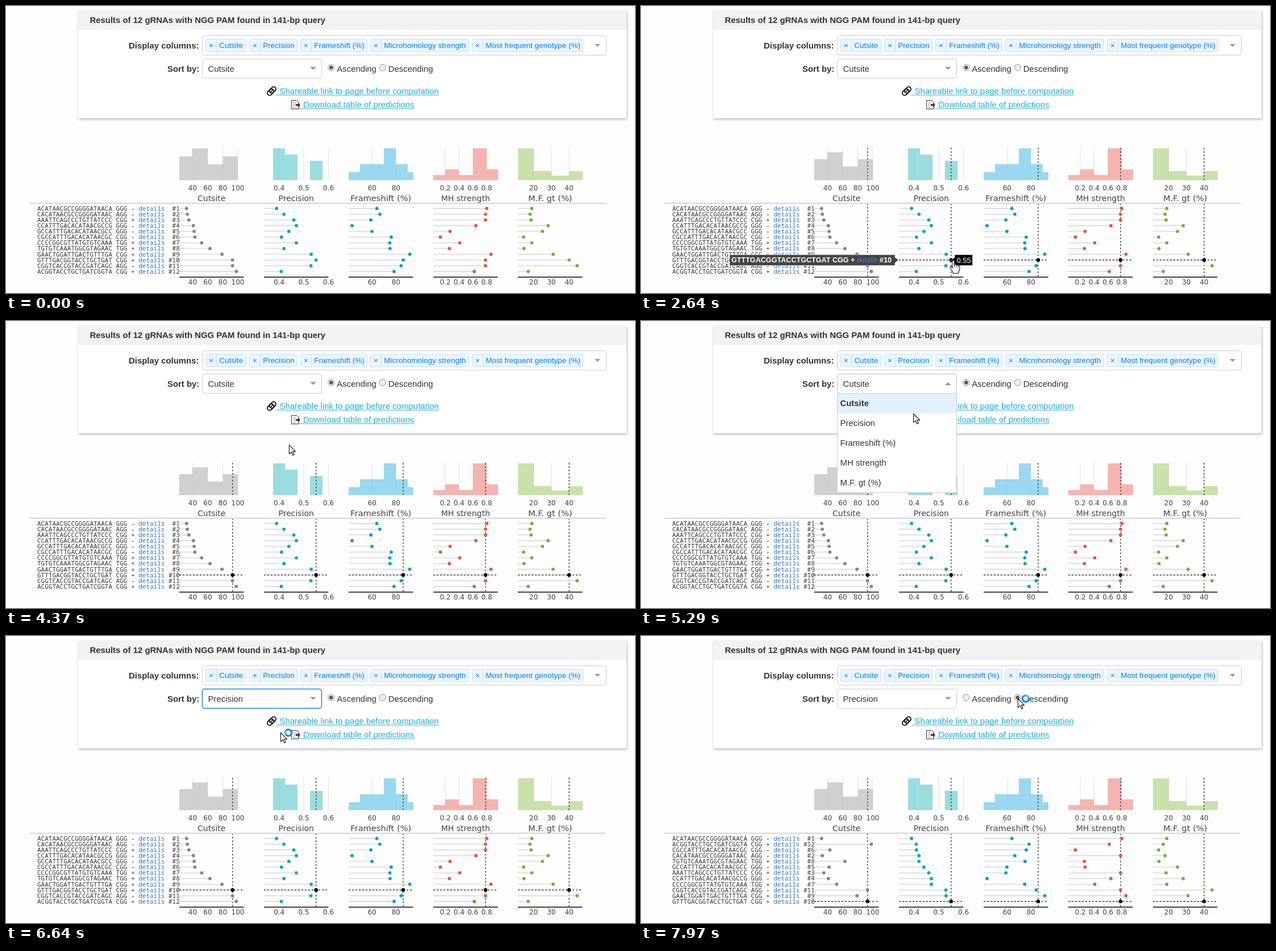
An HTML page for the animation above (8000 ms loop, 1107 by 506 pixels).

```html
<!DOCTYPE html>
<html lang="en">
<head>
<meta charset="utf-8">
<title>gRNA results</title>
<style>
html, body { margin: 0; width: 100%; height: 100%; overflow: hidden; background: #fdfdfd; }
svg { display: block; width: 1107px; height: 506px; }
text { white-space: pre; font-family: "Liberation Sans", Arial, sans-serif; font-size: 14.92px; fill: #333; }
.bold { font-weight: bold; }
.axis { font-family: "DejaVu Sans", Verdana, sans-serif; font-size: 12px; fill: #444; text-anchor: middle; }
.seq { font-family: "Noto Sans Mono", "DejaVu Sans Mono", monospace; font-size: 11px; fill: #333; }
.chip { font-size: 13.5px; fill: #007eff; }
.panel { filter: drop-shadow(1px 2px 2px rgba(0, 0, 0, .27)); }
.dash { stroke: #444; stroke-width: 1.4; stroke-dasharray: 3 3; }
.bars { shape-rendering: crispEdges; }
</style>
</head>
<body>
<svg id="stage" viewBox="0 0 1107 506"></svg>
<script>
const LOOP = 8000;
const stage = document.getElementById('stage');

function el(tag, attrs = {}, parent = stage) {
  const node = document.createElementNS('http://www.w3.org/2000/svg', tag);
  for (const key in attrs) node.setAttribute(key, attrs[key]);
  parent.appendChild(node);
  return node;
}
const group = (parent, attrs) => el('g', attrs, parent);
const rect = (x, y, width, height, fill, parent, more) =>
  el('rect', { x, y, width, height, fill, ...more }, parent);
const path = (d, attrs, parent) => el('path', { d, fill: 'none', ...attrs }, parent);
const dot = (cx, cy, r, fill, parent, more) => el('circle', { cx, cy, r, fill, ...more }, parent);
function text(x, y, str, parent, more) {
  const node = el('text', { x, y, ...more }, parent);
  node.textContent = str;
  return node;
}
function span(str, parent, attrs) {
  el('tspan', attrs, parent).textContent = str;
}
const show = (node, on) => { node.style.display = on ? '' : 'none'; };

// Settings panel
rect(127, 8, 965, 190, '#fff', stage, { class: 'panel' });
rect(127, 8, 965, 34, '#f2f2f2');
text(147.5, 30, 'Results of 12 gRNAs with NGG PAM found in 141-bp query', stage, { class: 'bold' });
text(216, 74.5, 'Display columns:', stage, { class: 'bold' });
text(284, 115.5, 'Sort by:', stage, { class: 'bold' });
rect(345.5, 52.5, 711, 34, '#fff', stage, { rx: 4, stroke: '#ccc' });
path('M1036 67h10l-5 5z', { fill: '#999' });

let chipX = 351;
for (const name of ['Cutsite', 'Precision', 'Frameshift (%)',
  'Microhomology strength', 'Most frequent genotype (%)']) {
  const box = rect(chipX + .5, 58.5, 0, 22, '#ebf5ff', stage, { rx: 2, stroke: '#c2e0ff' });
  path(`M${chipX + 19.5} 58.5v22`, { stroke: '#c2e0ff' });
  text(chipX + 6, 73.5, '×', stage, { class: 'chip' });
  const label = text(chipX + 24.3, 74, name, stage, { class: 'chip' });
  const width = Math.round(label.getComputedTextLength() + 29.7);
  box.setAttribute('width', width - 1);
  chipX += width + 5;
}

const sortBox = rect(345.5, 93.5, 210, 34, '#fff', stage, { rx: 4, stroke: '#ccc' });
const sortText = text(355.5, 115.5, 'Cutsite');
const sortArrow = path('', { fill: '#999' });

function radio(x, label) {
  dot(x, 108.5, 5.6, '#eee', stage, { stroke: '#8d8d8d' });
  text(x + 10, 115.5, label);
  return dot(x, 108.5, 3.2, '#555');
}
const ascDot = radio(572.3, 'Ascending');
const descDot = radio(662.8, 'Descending');

function link(x, y, label, to) {
  const g = group(stage);
  text(x, y, label, g, { style: 'fill: inherit' });
  path(`M${x - 5.5} ${y + 1.5}H${to}v1H${x - 5.5}z`, { fill: 'inherit' }, g);
  return { g, x0: x - 23, x1: to, y0: y - 14, y1: y + 4 };
}
const links = [
  link(481.5, 155, 'Shareable link to page before computation', 762),
  link(523, 179, 'Download table of predictions', 719)
];
const chain = group(stage, { transform: 'translate(467.5 150) rotate(-45)' });
for (const x of [-9, -3.5]) {
  rect(x, -4, 12.5, 8, 'none', chain, { rx: 4, stroke: '#1a1a1a', 'stroke-width': 2 });
}
path('M-4 0h8', { stroke: '#1a1a1a', 'stroke-width': 1.8 }, chain);
path('M502.5 166.5h9l4 4v11h-13z', { fill: '#fff', stroke: '#333' });
path('M505 170h5M505 173h5M505 176h4M505 179h6', { stroke: '#999' });
path('M510 173h4v-2.5l4 4-4 4v-2.5h-4z', { fill: '#5c2430' });

// One entry per gRNA, in order of cut site
const SEQS = `ACATAACGCCGGGGATAACA GGG -
CACATAACGCCGGGGATAAC AGG -
AAATTCAGCCCTGTTATCCC CGG +
CCATTTGACACATAACGCCG GGG -
GCCATTTGACACATAACGCC GGG -
CGCCATTTGACACATAACGC CGG -
CCCCGGCGTTATGTGTCAAA TGG +
TGTGTCAAATGGCGTAGAAC TGG +
GAACTGGATTGACTGTTTGA CGG +
GTTTGACGGTACCTGCTGAT CGG +
CGGTCACCGTACCGATCAGC AGG -
ACGGTACCTGCTGATCGGTA CGG +`.split('\n');
const CHARTS = [
  { name: 'Cutsite', lo: 22.3, hi: 107.9, step: 20, bin: 20, from: 20, tint: '#cfd0d1', ink: '#858585',
    data: [32, 33, 35, 41, 42, 43, 52, 63, 79, 93, 93, 98] },
  { name: 'Precision', lo: .339, hi: .6, step: .1, bin: .05, from: .375, tint: '#99dddf', ink: '#00a8b5',
    data: [.39, .42, .46, .47, .44, .41, .47, .42, .53, .55, .529, .409] },
  { name: 'Frameshift (%)', lo: 40.4, hi: 94.3, step: 20, bin: 10, from: 40, tint: '#99d8f0', ink: '#0a9ad7',
    data: [64, 66.5, 59, 43.3, 59.9, 76, 74.8, 75, 91.5, 86, 84.3, 78.4] },
  { name: 'MH strength', lo: .027, hi: .96, step: .2, bin: .2, from: 0, tint: '#f6b4b0', ink: '#e6553f',
    data: [.801, .783, .783, .644, .27, .13, .41, .26, .861, .783, .783, .62] },
  { name: 'M.F. gt (%)', lo: 11.2, hi: 47.5, step: 10, bin: 10, from: 10, tint: '#cbe1ac', ink: '#7aac3e',
    data: [19, 18, 18.6, 28.2, 25, 14.4, 19, 14.6, 31, 40, 44.5, 17] }
];
const WIDTH = 113.5;
const PICK = 9;

CHARTS.forEach((c, i) => {
  c.left = 305 + 149 * i;
  c.x = v => c.left + (Math.min(Math.max(v, c.lo), c.hi) - c.lo) / (c.hi - c.lo) * WIDTH;
  const ticks = [];
  for (let n = Math.ceil(c.lo / c.step); n * c.step < c.hi + 1e-6; n++) ticks.push(n * c.step);
  for (const v of ticks) {
    path(`M${c.x(v)} 248V307`, { stroke: '#ebebeb' });
    for (const y of [325, 491]) text(c.x(v), y, +v.toFixed(1), stage, { class: 'axis' });
  }

  c.bars = group(stage, { class: 'bars' });
  const counts = [];
  for (const v of c.data) {
    const n = Math.floor((v - c.from) / c.bin);
    counts[n] = (counts[n] || 0) + 1;
  }
  const unit = 56 / Math.max(...counts.filter(Boolean));
  counts.forEach((count, n) => {
    const a = c.x(c.from + n * c.bin), b = c.x(c.from + (n + 1) * c.bin);
    rect(a, 307 - count * unit, b - a, count * unit, c.tint, c.bars);
  });
  for (const v of ticks) path(`M${c.x(v)} 251V307`, { stroke: '#000', opacity: .04 });

  const size = c.name.includes('%') ? 14.6 : 14;
  text(c.left + WIDTH / 2, 344, c.name, stage, { class: 'axis', style: `font-size: ${size}px` });
  rect(c.left, 477, WIDTH, 2, '#444');
});
rect(41, 347, 1014, 1, '#c4c4c4');
rect(41, 348, 1014, 1, '#ececec');

const picked = group(stage);
for (const c of CHARTS) {
  const x = c.x(c.data[PICK]);
  path(`M${x} 307V250M${x} 477V349`, { class: 'dash' }, picked);
}
const pickedMarks = [];
const rows = SEQS.map((seq, i) => {
  const g = group(stage);
  const line = text(55, 3.8, '', g, { class: 'seq' });
  span(seq + ' ', line);
  span('details', line, { fill: '#3470d2' });
  span(` #${i + 1}`.padStart(i < 9 ? 4 : 3), line);
  for (const c of CHARTS) {
    const x = c.x(c.data[i]);
    path(`M${c.left} 0H${x}`, { stroke: '#dedede', 'stroke-width': 1.8 }, g);
    dot(x, 0, 2.9, c.ink, g);
    if (i !== PICK) continue;
    const mark = group(g);
    path(`M${c.left} 0h${WIDTH}`, { class: 'dash' }, mark);
    dot(x, 0, 3.3, '#0a0a0a', mark);
    pickedMarks.push(mark);
  }
  return g;
});
const precision = CHARTS[1].data;
const byCutsite = SEQS.map((_, i) => i);
const byPrecision = [...byCutsite].sort((a, b) => precision[a] - precision[b]);

// Hover labels
const hover = group(stage);
const outline = { stroke: '#fff', 'stroke-width': .6 };
path('M156 438.5H447V443L453 448L447 453V457.5H156z', { ...outline, fill: '#444' }, hover);
const tip = text(159, 452.4, '', hover, { style: 'font-size: 12.6px; fill: #fff' });
span(SEQS[PICK] + ' ', tip, { class: 'bold' });
span('details', tip, { fill: '#4a7de0' });
span(' #10', tip, { class: 'bold' });
const valueBox = path('M546 448L552 443V438.5H583.5V457.5H552V453z', outline, hover);
text(555.5, 452.6, '0.55', hover, { style: 'font-size: 13px; fill: #fff' });

// Drop-down menu
const menu = group(stage);
rect(345.5, 127.5, 210, 175, '#fff', menu, { stroke: '#ccc', rx: 2 });
const optionBack = rect(346, 128, 209, 34.8, '#e4f2ff', menu);
CHARTS.forEach((c, i) =>
  text(350.5, 150.3 + i * 34.8, c.name, menu, i ? {} : { class: 'bold' }));

// Pointer
const pointer = group(stage);
const ink = { fill: '#fff', stroke: '#111', 'stroke-width': 1.1, 'stroke-linejoin': 'round' };
const arrow = path('M.5 .5V16.2L4.2 12.8L6.8 18.6L9.2 17.5L6.6 11.9H11.6z', ink, pointer);
const hand = group(pointer);
path('M-2 2a1.8 1.8 0 0 1 3.6 0V8.4c.5-1.2 3-1.2 3.4.4c.5-1 2.8-.8 3.2.8c.6-.8 2.6-.5 2.6 1.2' +
  'V16c0 2-1.8 3.5-1.8 5V23.3H-1V21.5C-2 19-4.5 17-6 13.6C-6.6 12-4.8 11-3.6 12.2L-2 14z', ink, hand);
path('M1.6 8v4M5 9v3.5M8.2 10v3', { stroke: '#111' }, hand);
const ring = group(pointer, { transform: 'translate(14 .5)' });
dot(0, 0, 5.6, '#fff', ring, { stroke: '#1d8fe6', 'stroke-width': 3.4 });
const glint = path('M0 -5.6A5.6 5.6 0 0 1 5.6 0', { stroke: '#6cc0f7', 'stroke-width': 2.6 }, ring);

// Each move: start, end, destination
const MOVES = [
  [500, 1100, 557, 444.5], [1100, 1330, 550, 448], [3200, 3620, 570, 402],
  [4080, 4370, 498, 218.5], [4370, 4720, 478, 105], [5110, 5290, 479, 163],
  [5490, 5520, 483, 170], [7330, 7660, 663, 110]
];
function pointerAt(t) {
  let x = 582, y = 494;
  for (const [t0, t1, toX, toY] of MOVES) {
    const k = Math.min(1, Math.max(0, (t - t0) / (t1 - t0)));
    x += (toX - x) * k;
    y += (toY - y) * k;
  }
  return [x, y];
}

function draw(t) {
  const open = t >= 4830 && t < 5800;
  const chosen = t >= 5800;
  const focus = chosen && t < 7840;
  const pickOn = t >= 2560;

  sortBox.setAttribute('stroke', focus ? '#1483f5' : open ? '#bbb' : '#ccc');
  sortBox.setAttribute('stroke-width', focus ? 1.5 : 1);
  sortText.textContent = chosen ? 'Precision' : 'Cutsite';
  sortArrow.setAttribute('d', open ? 'M535 113h11l-5.5-5z' : 'M535 107.5h11l-5.5 5z');
  show(menu, open);
  optionBack.setAttribute('y', t < 5340 ? 128 : 162.8);
  show(ascDot, t < 7840);
  show(descDot, t >= 7840);

  const squash = pickOn ? .875 : 1;
  CHARTS[0].bars.setAttribute('transform', `translate(0 ${307 * (1 - squash)}) scale(1 ${squash})`);
  show(picked, pickOn);
  pickedMarks.forEach(m => show(m, pickOn));
  const order = t >= 6730 ? byPrecision : byCutsite;
  order.forEach((row, place) =>
    rows[row].setAttribute('transform', `translate(0 ${357 + place * 10.09})`));
  show(hover, t >= 1190 && t < 3300);
  valueBox.setAttribute('fill', pickOn ? '#000' : '#00a8b5');

  const [x, y] = pointerAt(t);
  let overLink = false;
  for (const l of links) {
    const over = !open && x > l.x0 && x < l.x1 && y > l.y0 && y < l.y1;
    l.g.setAttribute('fill', over ? '#0fa0ce' : '#1eaedb');
    overLink = overLink || over;
  }
  const overPlot = x > 454 && x < 567.5 && y > 349 && y < 478;
  show(pointer, t >= 500);
  pointer.setAttribute('transform', `translate(${x} ${y})`);
  show(hand, overLink || overPlot);
  show(arrow, !overLink && !overPlot);
  show(ring, (t >= 6640 && t < 6870) || t >= 7970);
  glint.setAttribute('transform', `rotate(${t * .36 % 360})`);
}

const start = performance.now();
function tick() {
  draw((performance.now() - start) % LOOP);
  requestAnimationFrame(tick);
}
tick();
</script>
</body>
</html>
```
